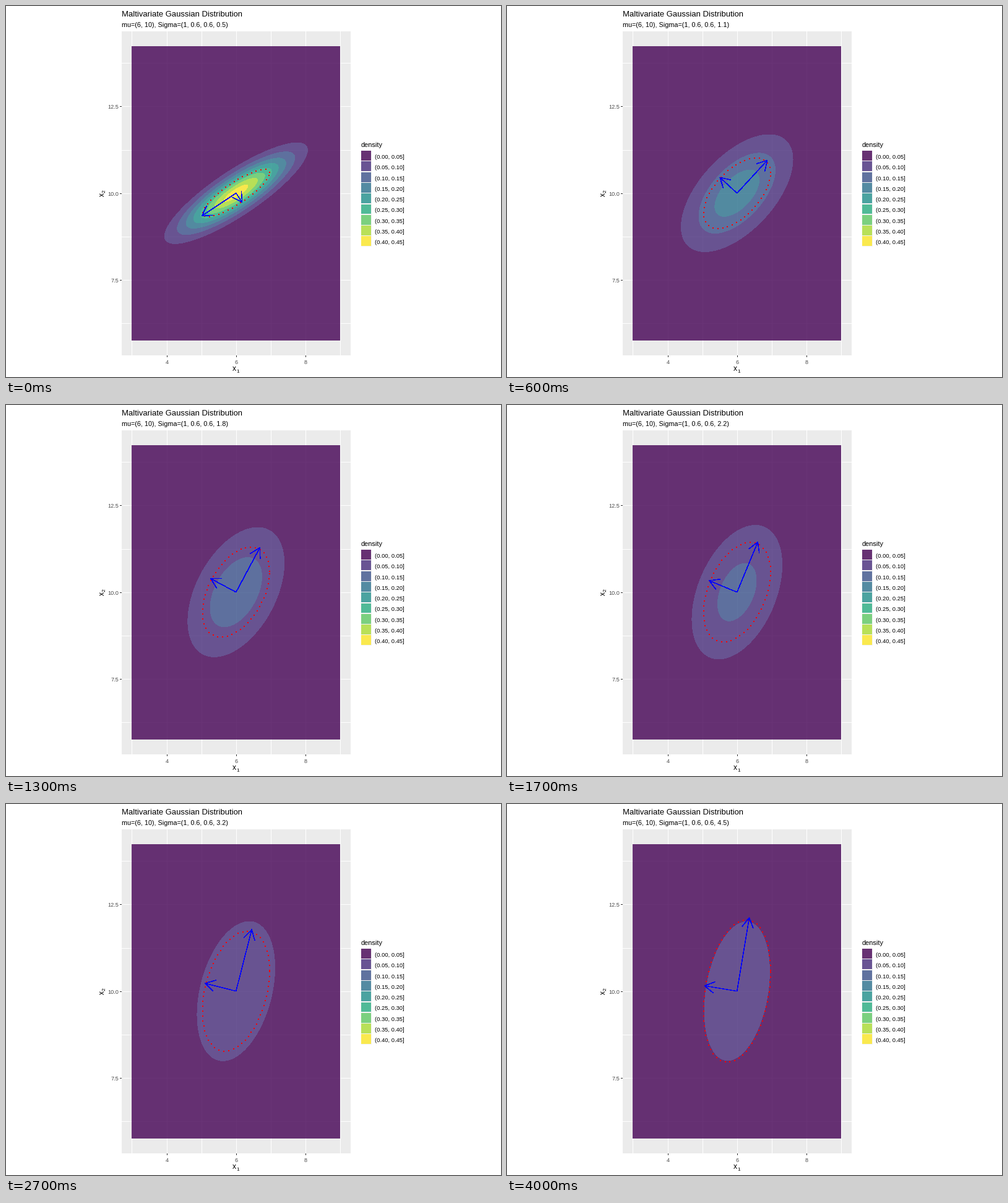
These frames come from a looping animation (800 px wide and 600 px high, 4.1 s). A matplotlib script:

```python
import numpy as np
import matplotlib.pyplot as plt
from matplotlib.animation import FuncAnimation
from matplotlib.colors import BoundaryNorm, ListedColormap
from matplotlib.patches import Rectangle

plt.rcParams["font.family"] = "Liberation Sans"

W, H, DPI = 800, 600, 100
CX, CY, UNIT = 371.75, 302.7, 56.1      # pixel centre and pixels per data unit
MU = (6, 10)
COV = 0.6
RADIUS = 0.967
DOT, PERIOD, BARB = 2, 8, 18            # pixels
FRAMES, INTERVAL = 41, 100

LEVELS = np.arange(10) * 0.05
COLORS = ["#440154", "#472D7B", "#3B528B", "#2C728E", "#21908C",
          "#27AD81", "#5DC863", "#AADC32", "#FDE725"]

fig = plt.figure(figsize=(W / DPI, H / DPI), dpi=DPI, facecolor="white")
ax = fig.add_axes([0, 0, 1, 1])
ax.set_xlim(0, W)
ax.set_ylim(H, 0)
ax.axis("off")
ax.set_autoscale_on(False)


def px(x):
    return CX + UNIT * x


def py(y):
    return CY - UNIT * y


def points(pixels):
    return pixels * 72 / DPI


def rect(x, y, w, h, color, z=0, alpha=1):
    ax.add_patch(Rectangle((x, y), w, h, facecolor=color, alpha=alpha,
                           linewidth=0, zorder=z))


def label(x, y, text, size, color="black", **kw):
    return ax.text(x, y, text, fontsize=points(size), color=color,
                   va="baseline", zorder=9, **kw)


def draw_panel():
    left, top, width, height = 187, 41, 370, 524
    rect(left, top, width, height, "#EBEBEB")
    for x in range(3, 10):
        col = round(px(x - MU[0]))
        rect(col, top, 1, height, "white", 1)
        if x in (4, 6, 8):
            rect(col, top + height, 1, 3, "#333333", 1)
            label(col, 579, str(x), 9, "#4D4D4D", ha="center")
    for y in np.arange(6.25, 14, 1.25):
        row = round(py(y - MU[1]))
        rect(left, row, width, 1, "white", 1)
        if y % 2.5 == 0:
            rect(left - 3, row, 3, 1, "#333333", 1)
            label(182.5, row + 4, f"{y:.1f}", 9.2, "#4D4D4D", ha="right")

    label(366, 590, "x", 12)
    label(372.3, 593, "1", 8.5)
    up = dict(rotation=90, rotation_mode="anchor")
    label(159, 308, "x", 12, **up)
    label(161, 302, "2", 8.5, **up)


def draw_legend():
    label(574, 228, "density", 11)
    rect(574, 234, 17, 155, "#F2F2F2")
    for i, color in enumerate(COLORS):
        shift = 17.28 * i
        top, bottom = round(234.15 + shift), round(250 + shift)
        rect(574, top, 16, bottom - top, color, 1, 0.8)
        lo, hi = LEVELS[i], LEVELS[i] + 0.05
        label(596, 247 + shift, f"({lo:.2f}, {hi:.2f}]", 9.4)


def stroke():
    # Unsmoothed strokes fill every pixel they touch, so a thin one suffices.
    return ax.plot([], [], color="blue", linewidth=points(0.45),
                   antialiased=False, solid_capstyle="butt",
                   solid_joinstyle="round", zorder=5)[0]


draw_panel()
draw_legend()
label(187, 17, "Maltivariate Gaussian Distribution", 13)
subtitle = label(187, 34, "", 10.75)

# One density sample per pixel centre of the coloured area.
X0, X1, Y0, Y1 = 203, 540, 65, 541
gx, gy = np.meshgrid((np.arange(X0, X1) + 0.5 - CX) / UNIT,
                     (CY - np.arange(Y0, Y1) - 0.5) / UNIT)
bands = ax.imshow(np.zeros(gx.shape), cmap=ListedColormap(COLORS),
                  norm=BoundaryNorm(LEVELS, len(COLORS)), alpha=0.8,
                  extent=(X0, X1, Y1, Y0), origin="upper", aspect="auto",
                  interpolation="nearest", zorder=3)
ring, = ax.plot([], [], "s", color="red", markersize=points(DOT),
                markeredgewidth=0, zorder=4)
arrows = [(stroke(), stroke()) for _ in range(2)]
theta = np.linspace(0, 2 * np.pi, 241)


def density(var):
    det = var - COV ** 2
    q = (var * gx ** 2 - 2 * COV * gx * gy + gy ** 2) / det
    return np.exp(-q / 2) / (2 * np.pi * np.sqrt(det))


def ring_dots(var):
    """Points at equal distances along the ellipse."""
    x = RADIUS * np.cos(theta)
    y = COV * x + RADIUS * np.sqrt(var - COV ** 2) * np.sin(theta)
    x, y = px(x), py(y)
    length = np.append(0, np.cumsum(np.hypot(np.diff(x), np.diff(y))))
    at = np.arange(DOT / 2, length[-1], PERIOD)
    return np.interp(at, length, x), np.interp(at, length, y)


def principal_axes(var):
    """Eigenvectors scaled by their standard deviations."""
    mid, gap = (1 + var) / 2, np.hypot((1 - var) / 2, COV)
    v = np.array([COV, mid + gap - 1])
    v /= np.hypot(*v)
    sign = 1 if var >= 1 else -1
    major = sign * v * np.sqrt(mid + gap)
    minor = sign * np.array([-v[1], v[0]]) * np.sqrt(mid - gap)
    return major, minor


def set_arrow(shaft, head, vec):
    x, y = px(vec[0]), py(vec[1])
    shaft.set_data([CX, x], [CY, y])
    back = np.arctan2(CY - y, CX - x)
    a, b = back - np.pi / 6, back + np.pi / 6
    head.set_data([x + BARB * np.cos(a), x, x + BARB * np.cos(b)],
                  [y + BARB * np.sin(a), y, y + BARB * np.sin(b)])


def update(frame):
    var = round(0.5 + 0.1 * frame, 1)
    subtitle.set_text(f"mu=(6, 10), Sigma=(1, 0.6, 0.6, {var:g})")
    bands.set_data(density(var))
    ring.set_data(*ring_dots(var))
    for (shaft, head), vec in zip(arrows, principal_axes(var)):
        set_arrow(shaft, head, vec)
    return []


anim = FuncAnimation(fig, update, frames=FRAMES, interval=INTERVAL,
                     repeat=True, repeat_delay=0, blit=False)
plt.show()
```
